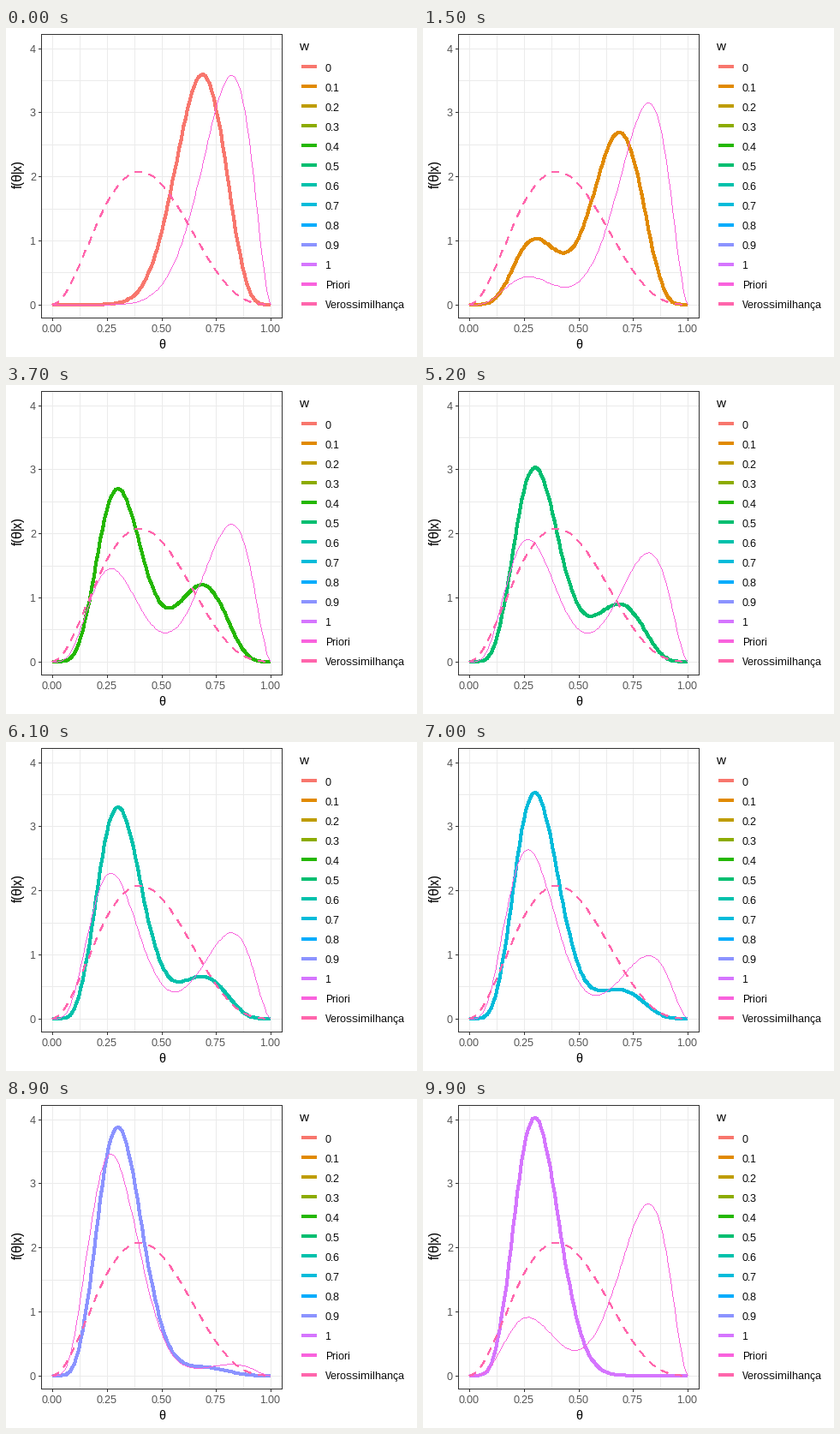
Write a matplotlib script that moves like this. It is 480 by 384 pixels and loops after 10000 ms.

```python
import math

import numpy as np
import matplotlib.pyplot as plt
from matplotlib.animation import FuncAnimation

W, H, DPI = 480, 384, 96
PX = 72 / DPI  # points per pixel
GRAY, GRID, TICK_TEXT = "#333333", "#EBEBEB", "#4D4D4D"
COLORS = ["#F8766D", "#E18A00", "#BE9C00", "#8CAB00", "#24B700", "#00BE70",
          "#00C1AB", "#00BBDA", "#00ACFC", "#8B93FF", "#D575FE", "#F962DD",
          "#FF65AC"]
LABELS = ["0"] + [f"0.{i}" for i in range(1, 10)] + ["1", "Priori", "Verossimilhança"]
LEFT, RIGHT, TOP, BOTTOM = 41, 322, 7, 338

plt.rcParams.update({
    "font.family": "Liberation Sans",
    "text.hinting": "native",
    "text.hinting_factor": 1,
    "text.kerning_factor": 6,
    "path.simplify": False,
})

fig = plt.figure(figsize=(W / DPI, H / DPI), dpi=DPI, facecolor="white")
ax = fig.add_axes([0, 0, 1, 1])
ax.set_xlim(0, W)
ax.set_ylim(H, 0)
ax.axis("off")


def sx(theta):
    return np.round(54.2 + 255 * np.asarray(theta))


def sy(density):
    return np.round(322.68 - 74.74 * np.asarray(density))


def line(x, y, color, width=1.0, **kw):
    kw = {"solid_capstyle": "butt", "dash_capstyle": "butt",
          "solid_joinstyle": "round", "snap": False, **kw}
    return ax.plot(x, y, color=color, lw=width * PX, antialiased=False, **kw)[0]


def text(x, y, s, size=12, color="black", **kw):
    ax.text(x, y, s, fontsize=size * PX, color=color,
            **{"va": "baseline", **kw})


def pixel_run(x, y):
    """Trace a polyline as separate one-pixel dashes, so it stays 1 px thin."""
    steps = np.maximum(abs(np.diff(x)), abs(np.diff(y))).astype(int)
    at = np.concatenate([i + np.arange(n) / n for i, n in enumerate(steps) if n])
    nodes = np.arange(len(x))
    px = np.floor(np.interp(at, nodes, x) + 0.5)
    py = np.floor(np.interp(at, nodes, y) + 0.5) + 0.5
    gap = np.full_like(px, np.nan)
    return np.column_stack([px, px + 1, gap]).ravel(), np.repeat(py, 3)


def beta_norm(a, b):
    return math.gamma(a + b) / (math.gamma(a) * math.gamma(b))


def beta_pdf(t, a, b):
    return beta_norm(a, b) * t ** (a - 1) * (1 - t) ** (b - 1)


# Two-component beta prior with a binomial likelihood (2 successes in 5)
HITS, MISSES = 2, 3
LOW, HIGH = (5, 12), (10, 3)
theta = np.linspace(0, 1, 101)


def prior(w):
    return w * beta_pdf(theta, *LOW) + (1 - w) * beta_pdf(theta, *HIGH)


def posterior(w):
    total = evidence = 0
    for weight, (a, b) in ((w, LOW), (1 - w, HIGH)):
        a2, b2 = a + HITS, b + MISSES
        marginal = weight * beta_norm(a, b) / beta_norm(a2, b2)
        total = total + marginal * beta_pdf(theta, a2, b2)
        evidence += marginal
    return total / evidence


# Panel
for v in np.arange(0, 1.01, 0.125):
    line([sx(v) + 0.5] * 2, [TOP, BOTTOM], GRID)
for v in np.arange(0, 4.1, 0.5):
    line([LEFT, RIGHT], [sy(v) + 0.5] * 2, GRID)

for v in np.arange(0, 1.01, 0.25):
    line([sx(v) + 0.5] * 2, [BOTTOM, BOTTOM + 4], GRAY)
    text(sx(v), 355, f"{v:.2f}", color=TICK_TEXT, ha="center")
for v in range(5):
    line([LEFT - 3, LEFT], [sy(v) + 0.5] * 2, GRAY)
    text(35, sy(v) + 5, str(v), color=TICK_TEXT, ha="right")

text(182, 374, "θ", 15, ha="center")
text(19, 170.5, "f(θ|x)", 16, rotation=90, rotation_mode="anchor", ha="center")

# Legend
text(342, 26, "w", 15)
for i, (label, color) in enumerate(zip(LABELS, COLORS)):
    y = 45.2 + 23.04 * i
    line([345, 363], [round(y)] * 2, color, 4)
    text(373, round(y + 5.5), label)

# Curves: without antialiasing every touched pixel is filled,
# so sloped strokes are set one pixel narrower than they appear
post_line = line([], [], COLORS[0], 3)
prior_line = line([], [], COLORS[11])
line(sx(theta), sy(beta_pdf(theta, HITS + 1, MISSES + 1)), COLORS[12], 1,
     linestyle=(0, (8, 8)))

line([LEFT + 0.5, RIGHT + 0.5, RIGHT + 0.5, LEFT + 0.5, LEFT + 0.5],
     [TOP + 0.5, TOP + 0.5, BOTTOM + 0.5, BOTTOM + 0.5, TOP + 0.5],
     GRAY, solid_joinstyle="miter", solid_capstyle="projecting")

# (first frame, steps) of the move away from each state
MOVES = [(5, 5), (15, 5)] + [(25 + 9 * i, 4) for i in range(9)]


def state_at(frame):
    """Return the posterior's state and the prior's tweened weight."""
    for state, (start, steps) in enumerate(MOVES):
        progress = (frame - start + 1) / steps
        if progress < 1:
            goal = (state + 1) % 11
            return state, (state + (goal - state) * max(progress, 0)) / 10
    return 0, 0.0


def update(frame):
    state, weight = state_at(frame)
    post_line.set_data(sx(theta), sy(posterior(state / 10)))
    post_line.set_color(COLORS[state])
    prior_line.set_data(*pixel_run(sx(theta), sy(prior(weight))))
    return post_line, prior_line


anim = FuncAnimation(fig, update, frames=100, interval=100, repeat=True,
                     repeat_delay=0, blit=False)
plt.show()
```
